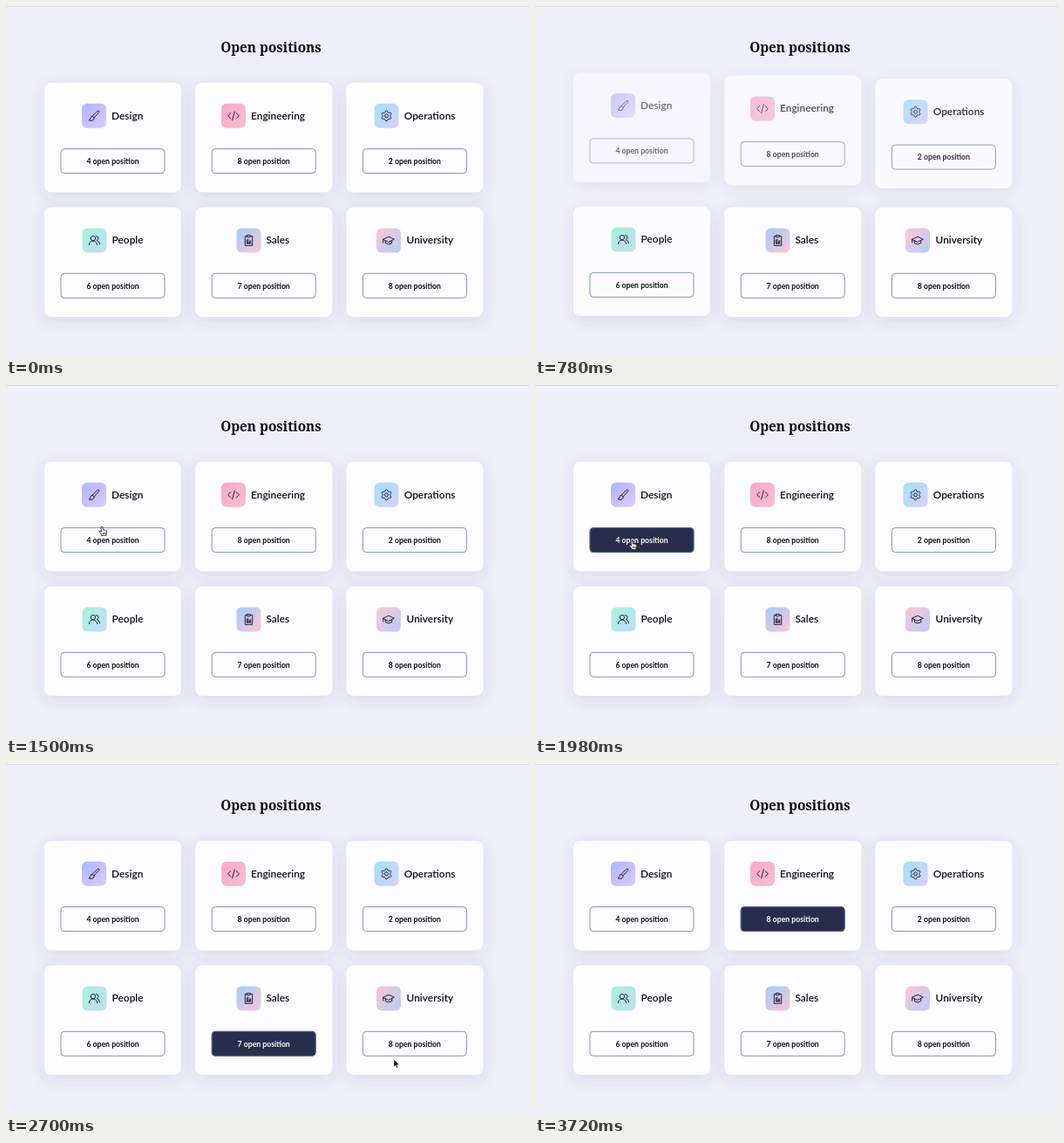
Animation of 600x402 px, one loop 3780 ms. Source, as an HTML page:

```html
<!DOCTYPE html>
<html lang="en">
<head>
<meta charset="utf-8">
<title>Open positions</title>
<style>
html, body { margin: 0; width: 100%; height: 100%; overflow: hidden; background: #eeeff9; }
svg { display: block; width: 600px; height: 402px; }
text { font-family: Lato, "Open Sans", sans-serif; font-weight: 700; }
.title { font: 700 15.3px "Noto Serif", serif; fill: #0b0b10; }
.label { font-size: 11.9px; font-weight: 600; fill: #0c0c12; }
.count { font-size: 8.7px; text-anchor: middle; }
.icon { fill: none; stroke: #23233a; stroke-width: 1; stroke-linecap: round; stroke-linejoin: round; }
</style>
</head>
<body>
<svg id="stage" viewBox="0 0 600 402">
  <defs>
    <filter id="shadow" x="-25%" y="-25%" width="150%" height="160%">
      <feDropShadow dx="0" dy="4" stdDeviation="9" flood-color="#4a4c78" flood-opacity=".13"/>
    </filter>
  </defs>
  <rect width="600" height="402" fill="#eeeff9"/>
  <rect width="600" height="1" fill="#dadbe5"/>
  <text class="title" x="304" y="53" text-anchor="middle">Open positions</text>
  <g id="cards"></g>
  <g id="cursor">
    <path id="arrow" d="M0 0V9.2L2.1 7.3L3.5 10.4L5 9.7L3.6 6.7H6.5Z" fill="#0a0a0a" stroke="#fff" stroke-width=".7"/>
    <path id="hand" d="M-1 .7Q0-.5 1 .7L1.4 4.1Q2.3 3.4 2.9 4.2Q3.9 3.6 4.4 4.5Q5.6 4.2 5.7 5.6Q5.9 8 4.9 9V10.4H-.4V9.1L-3 6.1Q-3.5 4.9-2.2 5L-.6 6.2ZM1.3 6.9V8.8M2.8 6.9V8.8M4.1 6.9V8.8"
      fill="#fff" stroke="#111" stroke-width=".8" stroke-linejoin="round"/>
  </g>
</svg>
<script>
const LOOP = 3780, FADE = 110;
const ENTER = { start: 600, gap: 19, time: 148, rise: 28 };

const gear = () => {
  let d = "";
  for (let i = 0; i < 48; i++) {
    const a = i / 48 * Math.PI * 2;
    const r = 5.1 + Math.tanh(2.5 * Math.cos(a * 6)) * .85;
    d += (i ? "L" : "M") + (r * Math.sin(a)).toFixed(2) + " " + (r * Math.cos(a)).toFixed(2);
  }
  return d + "ZM-2 0A2 2 0 1 0 2 0A2 2 0 1 0-2 0";
};

const icons = {
  brush: "M-1.7 .2L3.9-5.4Q5.4-6.3 5.8-5.2Q6-4.5 5.3-3.7L.2 1.9ZM-1.7 .2Q-4.2 .6-4.2 3Q-4.6 4.7-6 5Q-2.6 6.4-.8 4.7Q.5 3.4 .2 1.9",
  code: "M-3.3-3.2L-6.3 0L-3.3 3.2M3.3-3.2L6.3 0L3.3 3.2M1.3-5L-1.3 5",
  gear: gear(),
  people: "M-4.3-2.4A2.7 2.7 0 1 0 1.1-2.4A2.7 2.7 0 1 0-4.3-2.4M-6.2 5Q-5.7 .6-1.6 .6Q2.5 .6 3 5M2-5Q4.8-4.8 4.6-2.3Q4.4-.5 2.6 0Q5.6 .6 6.1 4",
  chart: "M-1.8-4.9H-4.2V5.8H4.2V-4.9H1.8M-1.8-6H1.8V-3.9H-1.8ZM-2.2 3.4V-.8M-.7 3.4V-1.6M.8 3.4V.7M2.2 3.4V.2M-2.2 3.4H2.4",
  cap: "M-6.3-1.3L0-4.3L6.3-1.3L0 1.7ZM-3.7 .1V3.2Q0 5.6 3.7 3.2V.1M-6.3-1.3V2.6"
};

// on / off: when the dark hover fill starts to appear and to leave
const cards = [
  { name: "Design", n: 4, icon: "brush", ix: 87, tx: 121, from: "#afb6fb", to: "#dccbfb", on: 1873, off: 2265 },
  { name: "Engineering", n: 8, icon: "code", ix: 247, tx: 281, from: "#f9a9c7", to: "#f9bed0", on: 3315, off: LOOP },
  { name: "Operations", n: 2, icon: "gear", ix: 422.5, tx: 456.7, from: "#a5e1fa", to: "#d5cffd" },
  { name: "People", n: 6, icon: "people", ix: 87.5, tx: 121.6, from: "#a6f3da", to: "#c1dcf4" },
  { name: "Sales", n: 7, icon: "chart", ix: 264.5, tx: 298.4, from: "#a3cdfb", to: "#f8c8d2", on: 2265, off: 2775 },
  { name: "University", n: 8, icon: "cap", ix: 425, tx: 459.6, from: "#fcc8d2", to: "#b4cdfb", on: 2775, off: 3315 }
];

// time, x, y of the pointer tip
const path = [
  [1110, -12, 235], [1480, 110, 162], [1740, 110, 162], [1920, 111, 178], [2040, 111, 178],
  [2300, 285, 316], [2440, 290, 318], [2640, 453, 344], [2700, 445, 338], [2820, 441, 322],
  [3000, 441, 322], [3230, 341, 180], [3400, 341, 180], [3640, 345, -20]
];

const $ = id => document.getElementById(id);
const clamp = v => Math.max(0, Math.min(1, v));
const smooth = v => v * v * (3 - 2 * v);

$("cards").innerHTML = cards.map((c, i) => {
  c.x = 44 + i % 3 * 173.2;
  c.y = i < 3 ? 88 : 230.7;
  const { x, y } = c, mid = x + 78.5;
  const button = `x="${x + 19}" y="${y + 75.6}" width="119" height="28" rx="4"`;
  const count = fill => `<text class="count" x="${mid}" y="${y + 93}" fill="${fill}">${c.n} open position</text>`;
  return `<g class="card">
    <linearGradient id="g${i}" x2="1" y2="1"><stop stop-color="${c.from}"/><stop offset="1" stop-color="${c.to}"/></linearGradient>
    <rect x="${x}" y="${y}" width="157" height="125.3" rx="8" fill="#fdfcff" filter="url(#shadow)"/>
    <rect x="${c.ix}" y="${y + 23.8}" width="28" height="28" rx="6" fill="url(#g${i})"/>
    <path class="icon" d="${icons[c.icon]}" transform="translate(${c.ix + 14} ${y + 37.8})"/>
    <text class="label" x="${c.tx}" y="${y + 41.5}">${c.name}</text>
    <rect ${button} fill="none" stroke="#8190bd"/>
    ${count("#0c0c12")}
    <g class="dark"><rect ${button} fill="#272d4b" stroke="#59648f"/>${count("#fff")}</g>
  </g>`;
}).join("");

const groups = [...document.querySelectorAll(".card")];
const darks = [...document.querySelectorAll(".dark")];

function pointer(t) {
  const k = path.findIndex(p => p[0] > t);
  if (k < 1) return null;
  const [t0, x0, y0] = path[k - 1], [t1, x1, y1] = path[k];
  const e = smooth((t - t0) / (t1 - t0));
  return [x0 + (x1 - x0) * e, y0 + (y1 - y0) * e];
}

const overButton = (x, y) => cards.some(c =>
  x > c.x + 18 && x < c.x + 139 && y > c.y + 73 && y < c.y + 105);

function draw(t) {
  cards.forEach((c, i) => {
    const start = ENTER.start + (5 - i) * ENTER.gap;
    const p = t < ENTER.start ? 1 : clamp((t - start) / ENTER.time);
    groups[i].setAttribute("opacity", p);
    groups[i].setAttribute("transform", `translate(0 ${(p - 1) * ENTER.rise})`);
    const dark = c.on ? clamp((t - c.on) / FADE) - clamp((t - c.off) / FADE) : 0;
    darks[i].setAttribute("opacity", smooth(dark));
  });

  const tip = pointer(t);
  $("cursor").style.display = tip && tip[1] > 17 ? "" : "none";
  if (!tip) return;
  const hand = overButton(...tip);
  $("cursor").setAttribute("transform", `translate(${tip})`);
  $("hand").style.display = hand ? "" : "none";
  $("arrow").style.display = hand ? "none" : "";
}

const begin = performance.now();
function frame(now) {
  draw(Math.max(0, now - begin) % LOOP);
  requestAnimationFrame(frame);
}
draw(0);
requestAnimationFrame(frame);
</script>
</body>
</html>
```
